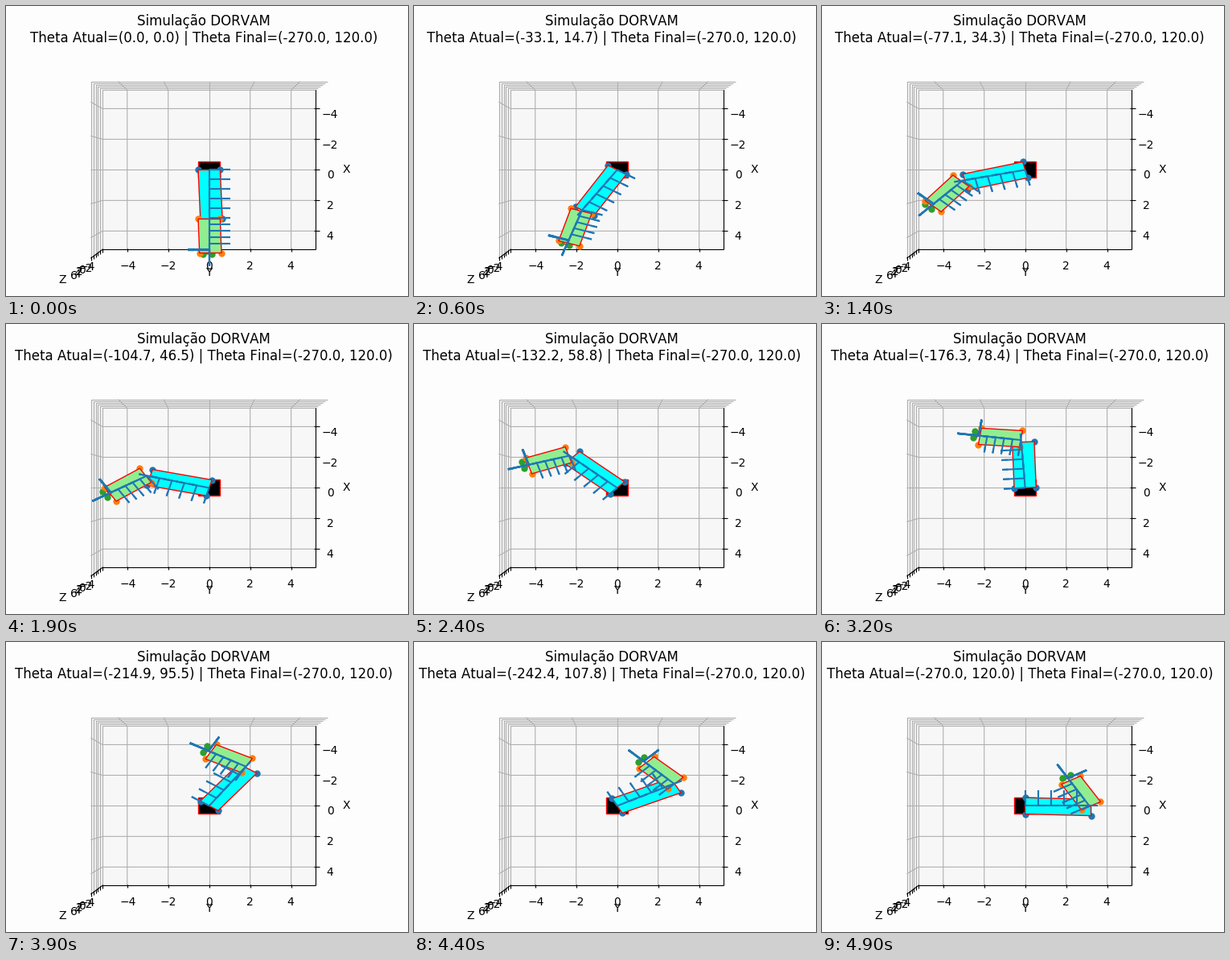
Write a matplotlib script that moves like this. It is 500 by 360 pixels and loops after 7900 ms.

```python
import numpy as np
import matplotlib.pyplot as plt
from matplotlib.animation import FuncAnimation
from matplotlib.collections import LineCollection
from matplotlib.patches import Polygon

W, H, DPI = 500, 360, 100
STEPS, FRAMES, INTERVAL = 49, 79, 100
GOAL = (-270.0, 120.0)
L1, L2 = 3.0, 2.0
CENTER = np.array([252.7, 203.4])
EDGE, Z_EDGE = 5.208, 0.5208      # axis limits with margin
BODY_Z, AXES_Z = 0.18, -0.08      # heights of the bodies and of the frames
WRIST_Z = np.linspace(-0.04, -0.12, 5)

plt.rcParams["font.family"] = "DejaVu Sans"
plt.rcParams["text.kerning_factor"] = 6
fig = plt.figure(figsize=(W / DPI, H / DPI), dpi=DPI, facecolor="#fdfdfd")
ax = fig.add_axes([0, 0, 1, 1])
ax.set_xlim(0, W)
ax.set_ylim(H, 0)
ax.axis("off")


def project(p, z):
    """Top view in perspective: world (x, y) at height z to pixels."""
    p = np.asarray(p, float)
    scale = np.array([268.1, 199.8]) / (10 - z)
    return CENTER + p[..., ::-1] * scale


def stroke(pts, color="#b0b0b0", lw=0.8, z=1):
    x, y = np.transpose(pts)
    ax.plot(x, y, color=color, lw=lw, zorder=z, solid_capstyle="butt")


def label(pos, text, va="center"):
    ax.text(*pos, text, size=10, ha="center", va=va, zorder=3)


def tick_label(p, z, v):
    label(project(p, z), str(v).replace("-", "\u2212"), "top")


def tick(p, direction, z):
    p, d = np.array(p), np.array(direction)
    stroke([project(p - 0.083 * d, z), project(p + 0.167 * d, z)], "k", z=2)


def draw_box():
    corners = [(-EDGE, -EDGE), (-EDGE, EDGE), (EDGE, EDGE), (EDGE, -EDGE)]
    lo, hi = project(corners, -Z_EDGE), project(corners, Z_EDGE)
    for pts, tone in [(lo, "#f7f7f7"),
                      ([lo[0], lo[1], hi[1], hi[0]], "#f9f9f9"),
                      ([lo[0], lo[3], hi[3], hi[0]], "#f3f3f3")]:
        ax.add_patch(Polygon(pts, fc=tone, ec="none", zorder=0))

    out = EDGE + 0.738
    z_out = -Z_EDGE - 0.0738
    for v in range(-4, 5, 2):
        stroke([project((v, EDGE), -Z_EDGE), project((v, -EDGE), -Z_EDGE),
                project((v, -EDGE), Z_EDGE)])
        stroke([project((EDGE, v), -Z_EDGE), project((-EDGE, v), -Z_EDGE),
                project((-EDGE, v), Z_EDGE)])
        tick((v, EDGE), (0, 1), -Z_EDGE)
        tick((EDGE, v), (1, 0), -Z_EDGE)
        tick_label((v, out), z_out, v)
        tick_label((out, v), z_out, v)

    for v in range(-4, 7, 2):
        z = (v - 1) / 10
        stroke([project((EDGE, -EDGE), z), project((-EDGE, -EDGE), z),
                project((-EDGE, EDGE), z)])
        tick((EDGE, -EDGE), (1, 0), z)
        tick_label((out, -out), z, v)

    for a, b in [(lo[1], lo[2]), (lo[3], lo[2]), (lo[3], hi[3])]:
        stroke([a, b], "k", z=2)
    far = EDGE + 1.604
    label(project((0, far), -0.681), "X")
    label(project((far, 0), -0.681), "Y")
    label(project((far, -far), 0), "Z")


def body(color, z):
    patch = Polygon(np.zeros((4, 2)), fc=color, ec="red", lw=1, zorder=z)
    return ax.add_patch(patch)


def dots(color, z):
    return ax.plot([], [], "o", color=color, ms=6, mew=0, zorder=z)[0]


def heading(deg):
    a = np.radians(deg)
    return (np.array([np.cos(a), np.sin(a)]),
            np.array([-np.sin(a), np.cos(a)]))


def quad(near, far, side):
    return project([near - side, near + side, far + side, far - side], BODY_Z)


def arrows(o, d, n, z, up=1):
    """Segments of one coordinate frame; heads are seen edge-on."""
    segs = [[project(o, z), project(o, z + 0.1 * up)]]
    for v in (d, n):
        tip = project(o + v, z)
        segs += [[project(o, z), tip], [project(o + 0.71 * v, z), tip]]
    return segs


draw_box()
base = body("black", 5)
base.set_xy(project([(-.5, -.5), (-.5, .5), (.5, .5), (.5, -.5)], 0))
arm1_dots, arm1 = dots("C0", 6), body("cyan", 7)
tool, tool_dots = body("none", 8), dots("C2", 9)
arm2_dots, arm2 = dots("C1", 10), body("lightgreen", 11)
frames3d = LineCollection([], colors="C0", linewidths=1.5, zorder=12)
ax.add_collection(frames3d, autolim=False)
title = ax.text(246, 44.8, "", size=12, ha="center", va="baseline", zorder=13)


def update(frame):
    t = min(frame, STEPS) / STEPS
    th1, th2 = (round(g * t, 6) + 0.0 for g in GOAL)
    d1, n1 = heading(th1)
    d2, n2 = heading(th1 + th2)
    elbow = L1 * d1
    wrist = elbow + L2 * d2

    # the bodies sit slightly off the joint axes at their far ends
    q1 = quad(0 * d1, 2.9 * d1 + [0.1, 0.1], 0.5 * n1)
    q2 = quad(elbow, elbow + 1.95 * d2 + [0.12, 0.06], 0.5 * n2)
    q3 = quad(wrist, wrist + 0.1 * d2 + [0.03, -0.07], 0.2 * n2)
    for patch, marks, q in [(arm1, arm1_dots, q1), (arm2, arm2_dots, q2)]:
        patch.set_xy(q)
        marks.set_data(*q.T)
    tool.set_xy(q3)
    tool_dots.set_data(*q3[2:].T)

    segs = []
    for k in range(5):
        segs += arrows(0.6 * k * d1, d1, n1, AXES_Z)
        segs += arrows(elbow + 0.4 * k * d2, d2, n2, AXES_Z)
        segs += arrows(wrist, d2, -n2, WRIST_Z[k], -1)
    frames3d.set_segments(segs)

    title.set_text("Simulação DORVAM\n"
                   f"Theta Atual=({th1:.1f}, {th2:.1f}) | "
                   f"Theta Final=({GOAL[0]}, {GOAL[1]})")
    return (arm1, arm1_dots, arm2, arm2_dots, tool, tool_dots,
            frames3d, title)


anim = FuncAnimation(fig, update, frames=FRAMES, interval=INTERVAL,
                     repeat=True, repeat_delay=0, blit=False)
plt.show()
```
